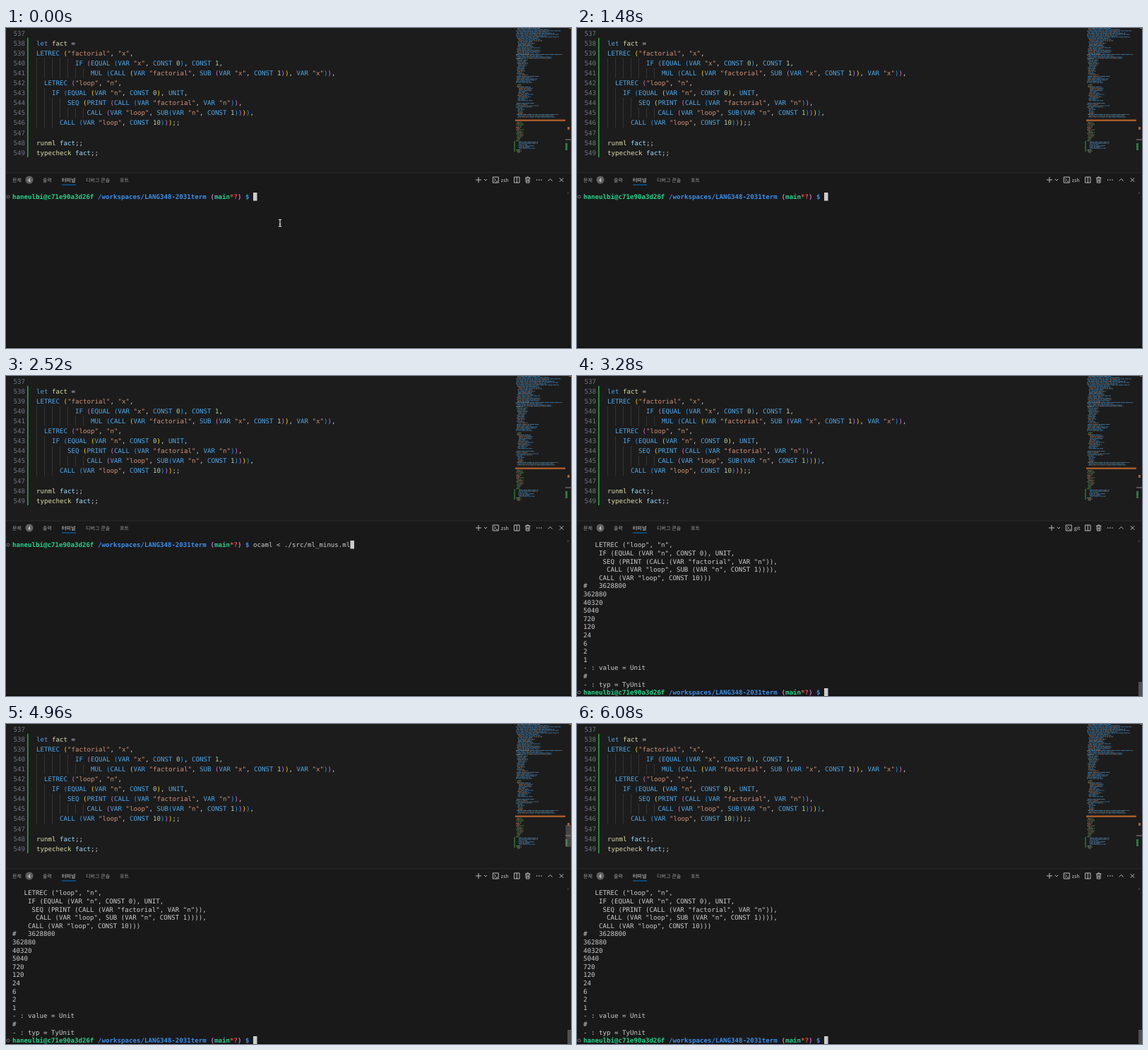
An HTML page with a canvas for the animation above (6.12 s loop, 800x453 px).

```html
<!DOCTYPE html>
<html lang="ko">
<head>
<meta charset="utf-8">
<style>
  html, body { margin: 0; width: 800px; height: 453px; overflow: hidden; background: #191919; }
  canvas { display: block; }
</style>
</head>
<body>
<canvas id="stage" width="800" height="453"></canvas>
<script>
const ctx = document.getElementById('stage').getContext('2d');
const LOOP = 6120, CHAR = 5.5, CODE_X = 43, TERM_X = 9;
const MONO = '9.136px "DejaVu Sans Mono", "Liberation Mono", monospace';
const SANS = '7px "Noto Sans CJK KR", "Noto Sans CJK", "Noto Sans", sans-serif';

// Moments of the session, in ms
const MOVE = 400, HIDE = 720, RECALL = 1920, ENTER = 2760, OUTPUT = 2960,
      GIT_ON = 3080, GIT_OFF = 3640, HOVER = 4840, LEAVE = 5200;

const code = `
let fact =
LETREC ("factorial", "x",
          IF (EQUAL (VAR "x", CONST 0), CONST 1,
              MUL (CALL (VAR "factorial", SUB (VAR "x", CONST 1)), VAR "x")),
  LETREC ("loop", "n",
    IF (EQUAL (VAR "n", CONST 0), UNIT,
        SEQ (PRINT (CALL (VAR "factorial", VAR "n")),
             CALL (VAR "loop", SUB(VAR "n", CONST 1)))),
      CALL (VAR "loop", CONST 10)));;

runml fact;;
typecheck fact;;`.split('\n');

const factorials = [3628800, 362880, 40320, 5040, 720, 120, 24, 6, 2, 1];
const output = [
  '   LETREC ("loop", "n",',
  '    IF (EQUAL (VAR "n", CONST 0), UNIT,',
  '     SEQ (PRINT (CALL (VAR "factorial", VAR "n")),',
  '      CALL (VAR "loop", SUB (VAR "n", CONST 1)))),',
  '    CALL (VAR "loop", CONST 10)))',
  ...factorials.map((n, i) => (i ? '' : '#   ') + n),
  '- : value = Unit', '#', '- : typ = TyUnit'
];
const prompt = [
  ['haneulbi@c71e90a3d26f ', '#23d18b'],
  ['/workspaces/LANG348-2031term ', '#3b8eea'],
  ['(', '#d670d6'], ['main', '#23d18b'], ['*?', '#f14c4c'], [') ', '#d670d6'],
  ['$ ', '#3b8eea']
];
const command = 'ocaml < ./src/ml_minus.ml';

function rect(x, y, w, h, color, alpha = 1) {
  ctx.globalAlpha = alpha;
  ctx.fillStyle = color;
  ctx.fillRect(x, y, w, h);
  ctx.globalAlpha = 1;
}

function text(s, x, y, color, font = MONO) {
  ctx.font = font;
  ctx.fillStyle = color;
  ctx.fillText(s, x, y);
}

function stroke(path, x, y, color = '#cccccc', width = 0.9) {
  ctx.save();
  ctx.translate(x, y);
  ctx.strokeStyle = color;
  ctx.lineWidth = width;
  ctx.stroke(new Path2D(path));
  ctx.restore();
}

const words = { let: '#569cd6', runml: '#dcdcaa', typecheck: '#dcdcaa', fact: '#9cdcfe' };
const brackets = ['#ffd700', '#da70d6', '#179fff'];

function drawCode() {
  let depth = 0;
  code.forEach((line, row) => {
    const y = 10.8 + row * 14.07;
    text(537 + row, 10.5, y, '#6e7681');
    const indent = line.search(/\S/);
    for (let c = 0; c < indent; c += 2) rect(CODE_X + c * CHAR, y - 10.3, 0.7, 14.07, '#404040');
    for (const m of line.matchAll(/"[^"]*"|[A-Z]+|[a-z]+|\d+|\S/g)) {
      const s = m[0];
      let color = '#cccccc';
      if (s === '(') color = brackets[depth++ % 3];
      else if (s === ')') color = brackets[--depth % 3];
      else if (s[0] === '"') color = '#ce9178';
      else if (/[A-Z]/.test(s)) color = '#4fa8e8';
      else if (/\d/.test(s)) color = '#b5cea8';
      else if (s === 'fact' && line.startsWith('let')) color = '#dcdcaa';
      else if (words[s]) color = words[s];
      text(s, CODE_X + m.index * CHAR, y, color);
    }
  });
  rect(30, 14, 1.6, 169, '#2ea043');
}

// Minimap blocks: top, bottom, indent, widest row, colour
const blocks = [
  [0, 14, 1, 70, '#4c93c8'], [14, 24, 3, 40, '#4c93c8'], [24, 37, 2, 38, '#5590b8'],
  [37, 43, 1, 70, '#4c93c8'], [43, 66, 2, 20, '#5b8fae'], [68, 78, 1, 36, '#4c93c8'],
  [80, 82, 1, 12, '#6a9955'], [83, 104, 3, 26, '#4c93c8'], [106, 112, 1, 34, '#5b8fae'],
  [113, 122, 3, 14, '#4c93c8'], [122, 126, 2, 62, '#5b8fae'],
  [133, 160, 1, 13, '#5f8f4b'], [161, 171, 3, 34, '#4c93c8'], [172, 176, 1, 10, '#9c9c7c']
];

function drawMinimap(hover) {
  let seed = 7;
  const rnd = () => (seed = (seed * 16807) % 2147483647) / 2147483647;
  for (const [top, bottom, indent, width, color] of blocks) {
    for (let y = top; y < bottom; y += 1.75) {
      const end = width * (0.5 + rnd() * 0.5);
      for (let x = indent + Math.floor(rnd() * 3); x < end;) {
        const w = 2 + rnd() * 5;
        rect(721 + x, y, Math.min(w, end - x), 1, rnd() < 0.15 ? '#b07c60' : color, 0.7);
        x += w + 0.8;
      }
    }
  }
  rect(721, 129.5, 71, 2.5, '#a75a2c');
  rect(719.5, 160, 1, 15, '#2ea043');
  rect(795, 140, 3, 4, '#a0602f');
  rect(792, 163, 3, 10, '#287a3a');
  rect(797, 0, 3, 1, '#a0602f');
  rect(792.5, 143, 7.5, 31, '#797979', 0.45 * hover);
  rect(792, 157.5, 8, 1, '#8a8a8a');
}

function drawHeader(label) {
  const shift = label === 'git' ? 3 : 0;
  const tabs = [['문제', 9], ['출력', 52], ['터미널', 79], ['디버그 콘솔', 113], ['포트', 161]];
  for (const [name, x] of tabs) text(name, x, 217.5, x === 79 ? '#e7e7e7' : '#9d9d9d', SANS);
  rect(79, 221.5, 20, 1, '#0078d4');
  ctx.fillStyle = '#616161';
  ctx.beginPath();
  ctx.arc(33, 215, 5.5, 0, 7);
  ctx.fill();
  text('4', 31, 217.5, '#f8f8f8', SANS);

  stroke('M-4 0H4M0 -4V4', 669 + shift, 215);
  stroke('M-2 -1L0 1L2 -1', 679 + shift, 215);
  stroke('M-4 -4H4V4H-4ZM-2.2 -2L0 0L-2.2 2M0.5 2.2H2.6', 693.3 + shift, 215);
  text(label, 700.8 + shift, 217.5, '#cccccc', SANS);
  stroke('M-3.7 -4H3.7V4H-3.7ZM0 -4V4', 723.3, 215);
  stroke('M-3.7 -2.8H3.7M-1.3 -2.8V-4H1.3V-2.8M-2.7 -2.8L-2.3 4H2.3L2.7 -2.8M-0.8 -1V2.5M0.8 -1V2.5', 738.7, 215);
  for (const x of [751, 754.2, 757.4]) rect(x, 214.4, 1.3, 1.3, '#cccccc');
  stroke('M-3 1.5L0 -1.5L3 1.5', 770.5, 215);
  stroke('M-2.7 -2.7L2.7 2.7M2.7 -2.7L-2.7 2.7', 786.5, 215);
}

const termY = row => 242.3 + row * 11.61;

function drawPrompt(row) {
  let col = 0;
  for (const [s, color] of prompt) {
    text(s, TERM_X + col * CHAR, termY(row), color, 'bold ' + MONO);
    col += s.length;
  }
  stroke('M2 0A2 2 0 1 1 -2 0A2 2 0 1 1 2 0', 3, termY(row) - 3.3, '#868686', 0.8);
  return col;
}

function drawTerminal(t) {
  let row = 0, col;
  if (t < OUTPUT) {
    col = drawPrompt(0);
    if (t >= RECALL) {
      text(command, TERM_X + col * CHAR, termY(0), '#cccccc');
      col += command.length;
    }
    if (t >= ENTER) [row, col] = [1, 0];
  } else {
    output.forEach((line, i) => {
      const indent = line.search(/\S/);
      text(line.trim(), TERM_X + indent * CHAR, termY(i), '#cccccc');
    });
    row = output.length;
    col = drawPrompt(row);
    rect(795, 433, 5, 20, '#4f4f4f');
  }
  rect(TERM_X + col * CHAR, termY(row) - 9.3, CHAR, 11.6, '#cccccc');
  rect(795, 233, 1.5, 1.5, '#666666');
}

function drawPointer(t) {
  if (t >= HIDE) return;
  const p = Math.max(0, (t - MOVE) / (HIDE - MOVE));
  const ibeam = 'M-2.2 -5Q0 -5 0 -3.5Q0 -5 2.2 -5M0 -4V4M-2.2 5Q0 5 0 3.5Q0 5 2.2 5M-1.3 1.5H1.3';
  stroke(ibeam, 388, 276 - 30 * p * p, '#e8e8e8', 1.1);
}

function draw(now) {
  const t = now % LOOP;
  const hover = t < HOVER ? 0
    : Math.min(1, (t - HOVER) / 100) * Math.max(0, 1 - Math.max(0, t - LEAVE) / 500);
  ctx.textRendering = 'geometricPrecision';
  rect(0, 0, 800, 205, '#1c1c1c');
  rect(0, 205, 800, 248, '#191919');
  rect(0, 204.5, 800, 1, '#2b2b2b');
  rect(0, 451.5, 800, 1.5, '#100d0d');
  drawCode();
  drawMinimap(hover);
  drawHeader(t >= GIT_ON && t < GIT_OFF ? 'git' : 'zsh');
  drawTerminal(t);
  drawPointer(t);
}

const start = performance.now();
function tick() {
  draw(performance.now() - start);
  requestAnimationFrame(tick);
}
tick();
</script>
</body>
</html>
```
